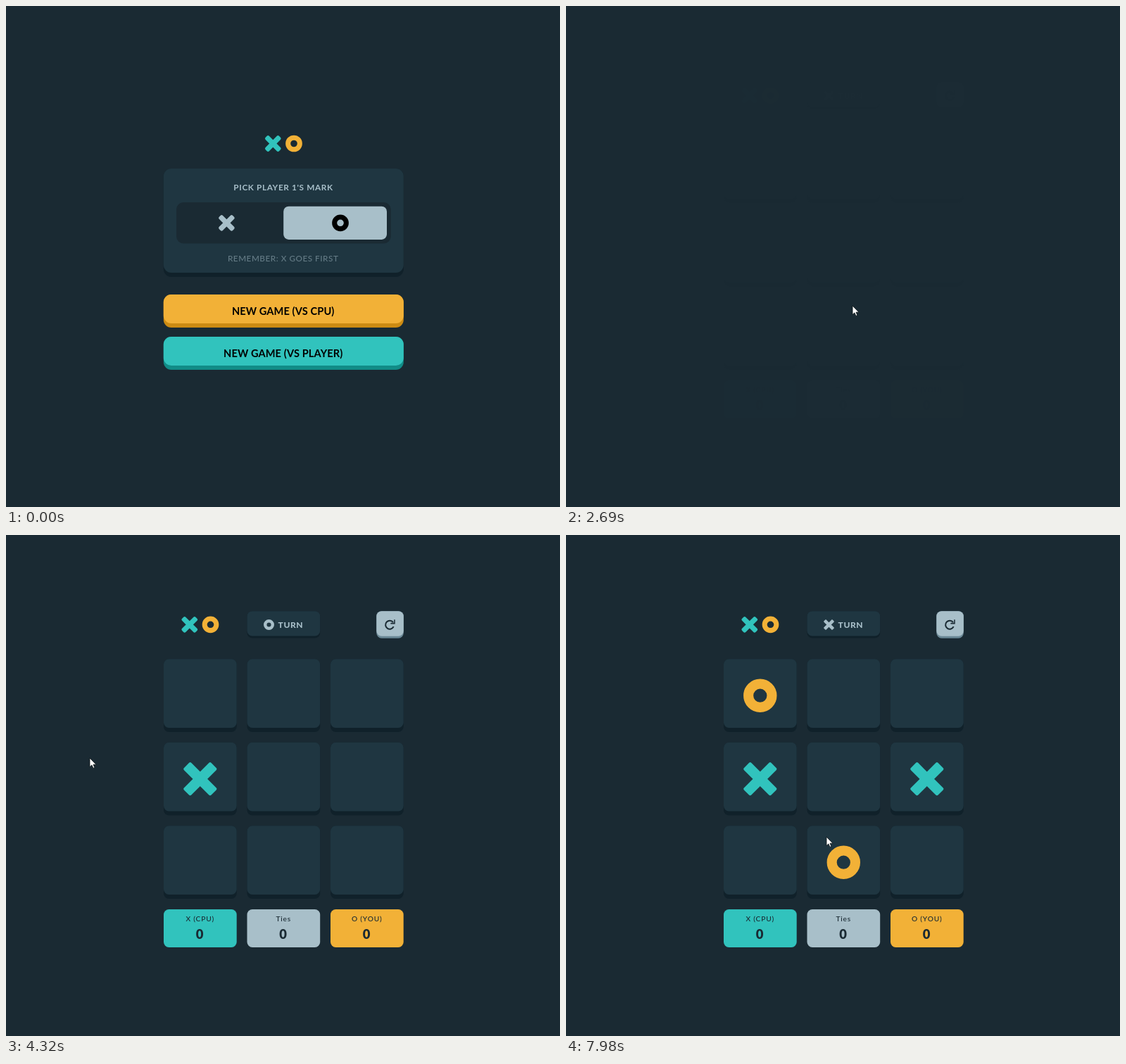
Write an HTML page that moves like this. It is 787 px wide and 712 px high and loops after 8000 ms.

```html
<!DOCTYPE html>
<html lang="en">
<head>
<meta charset="utf-8">
<title>Tic-tac-toe</title>
<style>
  html, body { margin: 0; width: 100%; height: 100%; overflow: hidden; background: #1a2a33; }
  svg { display: block; }
  text { font-family: Lato, sans-serif; font-weight: 700; }
</style>
</head>
<body>
<svg id="stage" width="787" height="712" viewBox="0 0 787 712"></svg>
<script>
const LOOP = 8000;
const BG = '#1a2a33', CARD = '#1f3641', CARD_EDGE = '#10212a', SILVER = '#a8bfc9',
      TEAL = '#31c3bd', YELLOW = '#f2b137';

// Moments of the game: [time, cell, mark]
const START = 2690;
const MOVES = [[3690, 3, 'x'], [5060, 0, 'o'], [6110, 5, 'x'], [7510, 7, 'o']];
// Previews while the pointer rests on a free cell: [from, to, cell]
const HOVERS = [[4590, 5060, 0], [6110, 6770, 4], [6850, 7510, 7]];
const HAND_TIMES = [[1250, 1650], [1840, START], [4590, 5060], [6110, 7510]];
// Pointer path: [time, x, y, linear]
const PATH = [
  [380, 752, 704], [700, 612, 430, 1], [900, 520, 361, 1], [1140, 411, 399, 1],
  [1210, 410, 399], [1350, 382, 318], [1550, 382, 318], [1830, 411, 405, 1],
  [2230, 407, 426], [3490, 407, 426], [4120, 121, 316], [4320, 119, 317],
  [4790, 270, 226], [5060, 270, 226], [5690, 398, 357], [6110, 398, 357],
  [6380, 393, 376], [6640, 393, 376], [6710, 391, 393, 1], [7240, 373, 455],
  [7510, 373, 455], [7840, 370, 455], [7979, 370, 455], [7980, 370, 429], [LOOP, 370, 429]
];

const rect = (x, y, w, h, r, fill, extra = '') =>
  `<rect x="${x}" y="${y}" width="${w}" height="${h}" rx="${r}" fill="${fill}" ${extra}/>`;
const raised = (x, y, w, h, r, depth, fill, edge, id = '') =>
  rect(x, y, w, h, r, edge) + rect(x, y, w, h - depth, r, fill, id && `id="${id}"`);
const label = (str, x, y, size, fill, spacing, extra = '') =>
  `<text x="${x}" y="${y}" font-size="${size}" fill="${fill}" letter-spacing="${spacing}" text-anchor="middle" ${extra}>${str}</text>`;

// Marks live in a 64 unit box around their centre
const place = (x, y, size, body, extra = '') =>
  `<g transform="translate(${x} ${y}) scale(${size / 64})" ${extra}>${body}</g>`;
const cross = (x, y, size, fill, r = 6, extra = '') => place(x, y, size,
  [45, -45].map(a => rect(-36.8, -9.8, 73.6, 19.6, r, fill, `transform="rotate(${a})"`)).join(''), extra);
const ring = (x, y, size, color, extra = '') => place(x, y, size,
  `<circle r="22.5" fill="none" stroke="${color}" stroke-width="19"/>`, extra);
const outline = (x, y, extra) => place(x, y, 47.4,
  `<g fill="none" stroke="${YELLOW}" stroke-width="2"><circle r="32"/><circle r="13"/></g>`, extra);

const logo = (x, y) => cross(x, y, 23.7, TEAL) + ring(x + 29.7, y, 23.7, YELLOW);
const cellX = i => 224 + 118.5 * (i % 3);
const cellY = i => 176.3 + 118.5 * Math.floor(i / 3);
const cellCentre = i => [cellX(i) + 51.8, cellY(i) + 51.9];

const menu = logo(379.3, 195.5) +
  raised(223.8, 231, 341, 154, 11, 6, CARD, CARD_EDGE) +
  label("PICK PLAYER 1'S MARK", 394, 262.2, 11.8, SILVER, .62) +
  rect(242, 279, 304.7, 58.5, 10, BG) +
  rect(247.5, 284.7, 147, 47.3, 7.4, '#263843', 'id="xHover"') +
  rect(394.2, 284.7, 146.8, 47.3, 7.4, SILVER) +
  cross(313.4, 308.3, 23.7, SILVER) + ring(475, 308.3, 23.7, '#000') +
  label('REMEMBER: X GOES FIRST', 393.7, 363, 11.7, SILVER, .55, 'opacity=".5" style="font-weight:500"') +
  raised(223.8, 410, 341, 47, 11, 6, YELLOW, '#cc8b13', 'cpuButton') +
  label('NEW GAME (VS CPU)', 393.7, 438.9, 14.6, '#000', .1) +
  raised(223.8, 470, 341, 47, 11, 6, TEAL, '#118c87') +
  label('NEW GAME (VS PLAYER)', 393.7, 498.9, 14.6, '#000', .1);

const score = (i, name, fill) => {
  const x = cellX(i);
  return rect(x, 532, 103.7, 54, 7.5, fill) +
    label(name, x + 51.7, 549.2, 10.2, BG, .8, 'style="font-weight:500"') +
    label('0', x + 51, 573.5, 18.4, BG, 0, 'style="font-weight:900"');
};

const game = logo(260.8, 127.3) +
  raised(342.5, 108.2, 103.7, 38.2, 7.4, 3, CARD, CARD_EDGE) +
  cross(373.5, 127.5, 15, SILVER, 4, 'id="turnX"') + ring(373.5, 127.5, 15, SILVER, 'id="turnO"') +
  label('TURN', 404.4, 131.9, 12, SILVER, .6, 'style="font-weight:800"') +
  raised(526.3, 108.2, 38.5, 38.5, 7.4, 3, SILVER, '#6b8997') +
  `<path d="M550.6 130.2A6 6 0 1 1 550 124.2" fill="none" stroke="${BG}" stroke-width="2"/>
   <path d="M551.2 120.2H552.7V126.4H546.4V124.8H551.2Z" fill="${BG}"/>` +
  [...Array(9).keys()].map(i =>
    raised(cellX(i), cellY(i), 103.7, 103.7, 7.5, 6, CARD, CARD_EDGE)).join('') +
  MOVES.map(([, cell, mark], n) => mark === 'x'
    ? cross(...cellCentre(cell), 47.4, TEAL, 3, `id="move${n}"`)
    : ring(...cellCentre(cell), 47.4, YELLOW, `id="move${n}"`)).join('') +
  HOVERS.map(([, , cell], n) => outline(...cellCentre(cell), `id="hover${n}"`)).join('') +
  score(0, 'X (CPU)', TEAL) + score(1, 'Ties', SILVER) + score(2, 'O (YOU)', YELLOW);

const pointer = `<g id="pointer" fill="#fff" stroke="#0b1216" stroke-width=".8" stroke-linejoin="round">
  <path id="arrow" d="M0 0V12.6L2.9 9.9L4.9 14.4L6.9 13.5L5 9.2H9Z"/>
  <path id="hand" d="M-1.3 1Q0 -1 1.3 1V5Q2.7 4.3 3.4 5.5Q4.8 4.9 5.5 6.2Q7.2 5.8 7.3 7.6V11Q7 13.5 5.9 14.6V16.8H-1V15Q-2.6 13.4 -4.6 9.8Q-5.2 8 -3.5 8L-1.3 10Z"/>
</g>`;

document.getElementById('stage').innerHTML =
  `<g id="menu">${menu}</g><g id="game">${game}</g>${pointer}`;

const el = id => document.getElementById(id);
const show = (id, on) => el(id).setAttribute('display', on ? 'inline' : 'none');
const ramp = (t, from, to) => Math.min(1, Math.max(0, (t - from) / (to - from)));
const mix = (a, b, k) => a + (b - a) * k;

function pointerAt(t) {
  const n = Math.max(1, PATH.findIndex(p => p[0] > t));
  const [t0, x0, y0] = PATH[n - 1], [t1, x1, y1, linear] = PATH[n];
  const k = ramp(t, t0, t1), e = linear ? k : k * k * (3 - 2 * k);
  return [mix(x0, x1, e), mix(y0, y1, e)];
}

function draw(t) {
  show('menu', t < START);
  show('game', t >= START);
  el('game').setAttribute('opacity', ramp(t, START, 3160));
  el('xHover').setAttribute('opacity', ramp(t, 1210, 1350) - ramp(t, 1840, 1990));
  const glow = ramp(t, 1840, 2040);
  el('cpuButton').setAttribute('fill',
    `rgb(${mix(242, 255, glow)},${mix(177, 200, glow)},${mix(55, 96, glow)})`);

  const played = MOVES.filter(([time]) => t >= time).length;
  MOVES.forEach((_, n) => show('move' + n, n < played));
  show('turnX', played % 2 === 0);
  show('turnO', played % 2 === 1);
  HOVERS.forEach(([from, to], n) => show('hover' + n, t >= from && t < to));

  const hand = HAND_TIMES.some(([from, to]) => t >= from && t < to);
  show('pointer', t >= PATH[0][0]);
  show('hand', hand);
  show('arrow', !hand);
  el('pointer').setAttribute('transform', `translate(${pointerAt(t)})`);
}

function tick() {
  draw(performance.now() % LOOP);
  requestAnimationFrame(tick);
}
tick();
</script>
</body>
</html>
```
